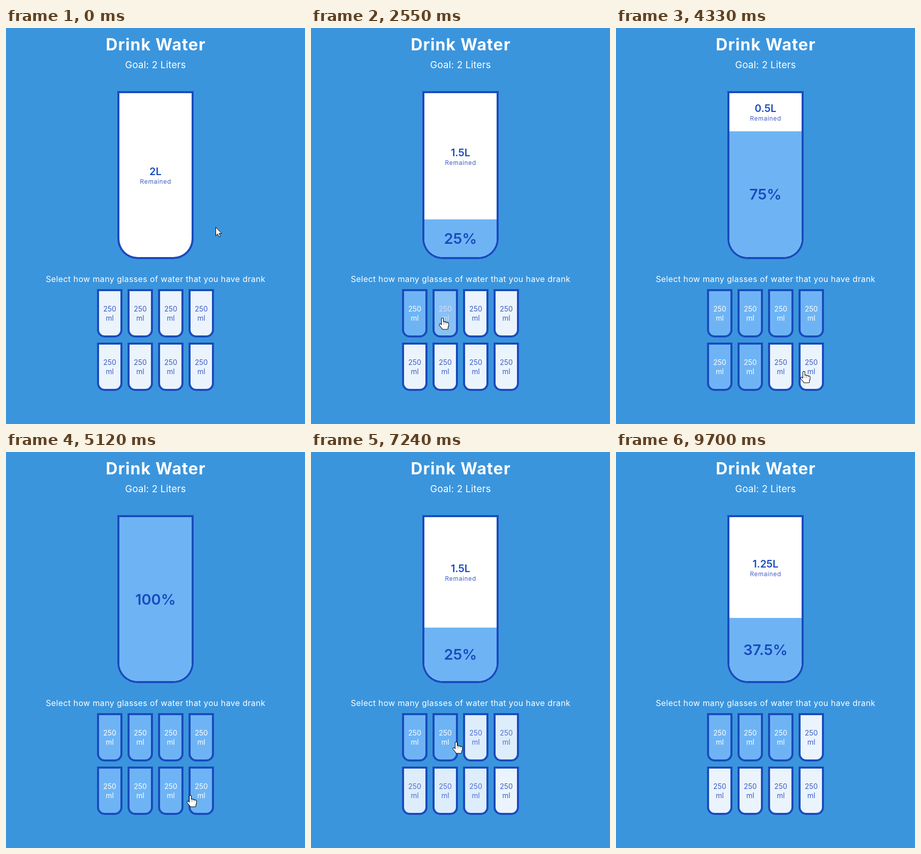
Recreate the animation shown at these times as an HTML page with a canvas. Size 588 px wide and 778 px high, loop 9.73 s.

```html
<!DOCTYPE html>
<html lang="en">
<head>
<meta charset="utf-8">
<title>Drink Water</title>
<style>
  html, body { margin: 0; width: 100%; height: 100%; overflow: hidden; background: #3b95dd; }
  canvas { display: block; }
</style>
</head>
<body>
<canvas id="stage" width="588" height="778"></canvas>
<script>
const ctx = document.getElementById('stage').getContext('2d');
const LOOP = 9730, TRANSITION = 300, POINTER_END = 9000;
const PAGE = '#3b95dd', NAVY = '#194bbd', WATER = '#6eb4f5', EMPTY = '#ebf4fc', INK = '#3f5cc6';
const REST = { x: 412, y: 391 };

// Each click selects glasses up to `count`; `dx` is the pointer's offset from the glass centre.
const clicks = [
  { time: 1550, count: 1, dx: -6 },
  { time: 2402, count: 2, dx: -5 },
  { time: 3100, count: 4, dx: -5 },
  { time: 3850, count: 6, dx: -5 },
  { time: 4580, count: 8, dx: -14 },
  { time: 5838, count: 7, dx: 9 },
  { time: 7059, count: 2, dx: 22 },
  { time: 8200, count: 3, dx: -2 }
];

const lerp = (a, b, k) => a + (b - a) * k;
const clamp = x => Math.min(1, Math.max(0, x));
const slot = i => ({ x: 179 + i % 4 * 60, y: 513 + Math.floor(i / 4) * 105 });

function mix(a, b, k) {
  const channel = (hex, i) => parseInt(hex.slice(1 + 2 * i, 3 + 2 * i), 16);
  return `rgb(${[0, 1, 2].map(i => Math.round(lerp(channel(a, i), channel(b, i), k)))})`;
}

// CSS "ease": cubic-bezier(.25, .1, .25, 1)
function ease(x) {
  const bezier = (p, q, s) => 3 * p * s * (1 - s) ** 2 + 3 * q * s * s * (1 - s) + s ** 3;
  let low = 0, high = 1;
  for (let i = 0; i < 24; i++) {
    const mid = (low + high) / 2;
    if (bezier(.25, .25, mid) < x) low = mid; else high = mid;
  }
  return bezier(.1, 1, low);
}

function stateAt(t) {
  const past = clicks.filter(c => c.time <= t);
  const last = past.at(-1), previous = past.at(-2);
  return {
    from: previous?.count ?? 0,
    to: last?.count ?? 0,
    k: last ? ease(clamp((t - last.time) / TRANSITION)) : 0
  };
}

function text(str, x, centerY, size, color, weight = 400, tracking = 0) {
  ctx.font = `${weight} ${size}px Inter, "Open Sans", sans-serif`;
  ctx.letterSpacing = tracking * size + 'px';
  ctx.textAlign = 'center';
  ctx.fillStyle = color;
  ctx.fillText(str, x + tracking * size / 2, Math.round(centerY + size * .364));
}

function roundedBottom(x, y, w, h, r) {
  ctx.beginPath();
  ctx.roundRect(x, y, w, h, [0, 0, r, r]);
}

function glass(x, y, w, h, r, color) {
  roundedBottom(x, y, w, h, r);
  ctx.fillStyle = NAVY;
  ctx.fill();
  roundedBottom(x + 4, y + 4, w - 8, h - 8, r - 4);
  ctx.fillStyle = color;
  ctx.fill();
}

function bigGlass({ from, to, k }) {
  glass(219, 124, 150, 330, 40, '#fff');
  const level = Math.min(322, lerp(from, to, k) * 330 / 8);
  const top = Math.round(450 - level);
  ctx.save();
  roundedBottom(223, 128, 142, 322, 36);
  ctx.clip();
  if (to < 8) {
    const mid = (128 + top) / 2;
    text(2 - to / 4 + 'L', 294, mid - 7.5, 20, NAVY, 600);
    text('Remained', 294, mid + 12.5, 12, INK, 400, .055);
  }
  if (to > 0) {
    ctx.fillStyle = WATER;
    ctx.fillRect(223, top, 142, 450 - top);
    text(to * 12.5 + '%', 294, (top + 450) / 2, 29, NAVY, 600);
  }
  ctx.restore();
}

function smallGlasses({ from, to, k }) {
  for (let i = 0; i < 8; i++) {
    const { x, y } = slot(i);
    const fill = lerp(i < from, i < to, k);
    glass(x, y, 50, 95, 15, mix(EMPTY, WATER, fill));
    const color = mix(INK, '#ffffff', fill);
    text('250', x + 25, y + 39, 14, color);
    text('ml', x + 25, y + 57, 14, color);
  }
}

// The pointer reaches each glass 250 ms before its click and lingers 200 ms after it.
function pointerAt(t) {
  let spot = REST, free = 0;
  for (const { time, count, dx } of clicks) {
    const start = Math.max(free, time - 900), end = time - 250;
    const u = clamp((t - start) / (end - start)), k = u * u * (3 - 2 * u);
    const { x, y } = slot(count - 1);
    spot = { x: lerp(spot.x, x + 25 + dx, k), y: lerp(spot.y, y + 56, k) };
    free = time + 200;
  }
  return { x: Math.round(spot.x), y: Math.round(spot.y) };
}

function drawHand() {
  ctx.lineCap = 'round';
  for (const [color, width] of [['#000', 5], ['#fff', 3]]) {
    ctx.strokeStyle = ctx.fillStyle = color;
    ctx.lineWidth = width;
    ctx.beginPath();
    for (let i = 0; i < 4; i++) {
      ctx.moveTo(i * 3.4 - .5, i ? 8.5 + i : 2.5);
      ctx.lineTo(i * 3.4 - .5, 16);
    }
    ctx.moveTo(-5, 14);
    ctx.lineTo(0, 20);
    ctx.rect(.5, 15, 8, 6);
    ctx.fill();
    ctx.stroke();
  }
}

function drawArrow() {
  const arrow = new Path2D('M.5.5V17L4.3 13.5L7 19.5L9.7 18.3L7 12.5H12Z');
  ctx.fillStyle = '#fff';
  ctx.strokeStyle = '#000';
  ctx.lineWidth = 1;
  ctx.fill(arrow);
  ctx.stroke(arrow);
}

function pointer(t) {
  if (t >= POINTER_END) return;
  const { x, y } = pointerAt(t);
  const overGlass = clicks.some((_, i) => {
    const s = slot(i);
    return x >= s.x && x < s.x + 50 && y >= s.y && y < s.y + 95;
  });
  ctx.save();
  ctx.translate(x, y);
  ctx.lineJoin = 'round';
  if (overGlass) drawHand(); else drawArrow();
  ctx.restore();
}

function draw(t) {
  const state = stateAt(t);
  ctx.fillStyle = PAGE;
  ctx.fillRect(0, 0, 588, 778);
  text('Drink Water', 294, 32, 32, '#fff', 700, .035);
  text('Goal: 2 Liters', 294, 72.5, 18.7, '#fff', 400, .012);
  bigGlass(state);
  text('Select how many glasses of water that you have drank', 294, 493, 16, '#fff', 400, .024);
  smallGlasses(state);
  pointer(t);
}

const begin = performance.now();
function tick() {
  draw((performance.now() - begin) % LOOP);
  requestAnimationFrame(tick);
}
tick();
</script>
</body>
</html>
```
